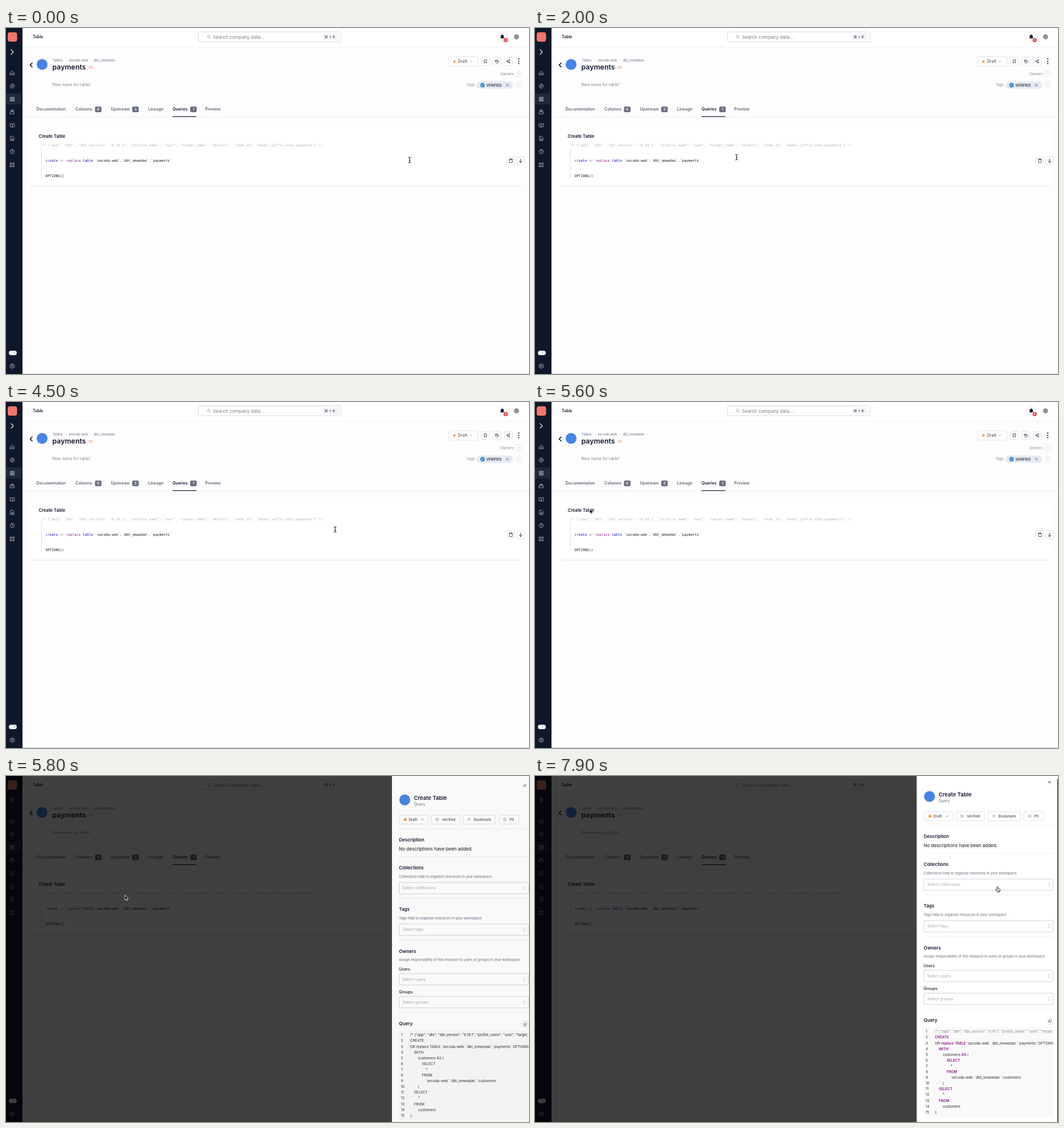
These frames come from a looping animation (920x608 px, 8000 ms). An HTML page:

```html
<!DOCTYPE html>
<html lang="en">
<head>
<meta charset="utf-8">
<title>Query drawer</title>
<style>
html, body { margin: 0; width: 100%; height: 100%; overflow: hidden; background: #fdfdfe; }
svg { display: block; width: 920px; height: 608px; font-family: Inter, "DejaVu Sans", sans-serif; }
.mono { font-family: "DejaVu Sans Mono", monospace; }
</style>
</head>
<body>
<svg id="stage" viewBox="0 0 920 608"></svg>
<script>
const INK = '#14182e', GREY = '#6b7080', PALE = '#a3a7b0', LINE = '#d9dbe0', BLUE = '#4784e6', PURPLE = '#8c168c';

const text = (x, y, s, size = 7, weight = 400, fill = INK, more = '') =>
  `<text x="${x}" y="${y}" font-size="${size}" font-weight="${weight}" fill="${fill}" ${more}>${s}</text>`;
const rect = (x, y, w, h, fill, r = 0, stroke = 'none') =>
  `<rect x="${x}" y="${y}" width="${w}" height="${h}" rx="${r}" fill="${fill}" stroke="${stroke}" stroke-width=".8"/>`;
const circle = (x, y, r, fill, stroke = 'none') =>
  `<circle cx="${x}" cy="${y}" r="${r}" fill="${fill}" stroke="${stroke}" stroke-width=".7"/>`;
const path = (d, stroke, width = 1, fill = 'none') =>
  `<path d="${d}" fill="${fill}" stroke="${stroke}" stroke-width="${width}" stroke-linecap="round" stroke-linejoin="round"/>`;
// Icons are drawn on a 24 unit grid and centred on x, y.
const icon = (x, y, size, d, stroke = INK, width = 2, fill = 'none') =>
  `<g transform="translate(${x - size / 2} ${y - size / 2}) scale(${size / 24})">${path(d, stroke, width, fill)}</g>`;
const rule = (x1, x2, y, color = '#e9eaee') => rect(x1, y - .4, x2 - x1, .8, color);

const ICONS = {
  home: 'M3 11 12 3l9 8v10h-6v-7H9v7H3z',
  compass: 'M12 2a10 10 0 1 0 .1 0zM16 8l-2 6-6 2 2-6z',
  list: 'M2 4H22M2 9.5H22M2 15H22M2 20.5H22',
  stack: 'M3 11h18v10H3zM5 7h14M7 3h10',
  book: 'M12 6C9 4 5 4 2 4v15c3 0 7 0 10 2 3-2 7-2 10-2V4c-3 0-7 0-10 2v15',
  file: 'M5 2h9l6 6v14H5zM9 18v-3M12 18v-6M15 18v-4',
  help: 'M12 2a10 10 0 1 0 .1 0zM9 9a3 3 0 1 1 4 3q-1 .5-1 2M12 17v.2',
  grid: 'M3 3h6v6H3zM15 3h6v6h-6zM3 15h6v6H3zM15 15h6v6h-6z',
  gear: 'M12 8.5a3.5 3.5 0 1 0 .1 0zM10 2h4l1 3 3 1.5 3-1 2 3.5-2.5 2v3l2.5 2-2 3.5-3-1-3 1.5-1 3h-4l-1-3-3-1.5-3 1-2-3.5 2.5-2v-3L1 9l2-3.5 3 1L9 5z',
  search: 'M10 3a7 7 0 1 0 .1 0zM15 15l6 6',
  bell: 'M12 2a7 7 0 0 0-7 7v5l-2 4h18l-2-4V9a7 7 0 0 0-7-7zM10 21h4',
  bookmark: 'M6 3h12v18l-6-5-6 5z',
  history: 'M3 5v5h5M3.5 10a9 9 0 1 1 0 5M12 7v5l4 2',
  share: 'M18 2a3 3 0 1 0 .1 0zM6 9a3 3 0 1 0 .1 0zM18 16a3 3 0 1 0 .1 0zM8.5 10.5l7-4M8.5 13.5l7 4',
  clipboard: 'M8 4H5v17h14V4h-3M8 2h8v5H8z',
  down: 'M12 3v18M5 14l7 7 7-7',
  cross: 'M5 5 19 19M19 5 5 19',
  plus: 'M12 6v12M6 12h12',
  check: 'M6 12l4 4 8-8',
  caret: 'M5 9l7 7 7-7',
  sort: 'M7 8l5-5 5 5M7 16l5 5 5-5',
  copy: 'M8 3h13v13H8zM16 16v5H3V8h5'
};

const sourceBadge = (x, y) => circle(x, y, 9.6, BLUE);
const pill = (x, y, w, h) => rect(x, y, w, h, '#fff', 2, LINE);

function sidebar() {
  const rows = { home: 79, compass: 102, list: 125, stack: 147.5, book: 171, file: 194, help: 217, grid: 240.5, gear: 594 };
  return rect(0, 0, 29, 608, '#0f172a') + rect(0, 115, 27, 19.5, '#1e293b')
    + rect(3, 7.5, 16.5, 16.5, '#f0776c', 4)
    + path('M9 38l4 4-4 4', '#dde1e8', 1.3)
    + Object.entries(rows).map(([name, y]) => icon(11, y, 9, ICONS[name], name == 'list' ? '#fff' : '#c3c9d4')).join('')
    + rect(5, 567, 14, 8, '#e6e8ec', 4) + circle(9.2, 571, 3.4, '#fff', '#bbc');
}

function header() {
  return rect(29, 0, 891, 33.5, '#fff') + rule(29, 920, 33.8, '#f0f0f3')
    + text(47, 18, 'Table', 7, 600)
    + rect(338.5, 7, 251, 17, '#fff', 2.5, '#cdd0d6')
    + icon(357, 15.5, 7.5, ICONS.search, '#777c88')
    + text(364, 18.6, 'Search company data...', 8.1, 400, '#777c88')
    + rect(557, 10, 28, 11, '#f3f4f6', 2) + text(560, 17.8, '⌘ + K', 6.6, 500, '#444a58')
    + circle(873, 15.5, 8.6, '#fff', '#dfe1e6') + icon(873, 15.5, 8.5, ICONS.bell, INK, 1.5, INK)
    + circle(879, 21.2, 3.7, '#e5484d') + text(879, 23, '8', 4.6, 500, '#fff', 'text-anchor="middle"')
    + circle(898, 15.5, 4.5, '#8d929c');
}

function hero() {
  const tabs = [[53.5, 'Documentation'], [122, 'Columns', 156.5, 6], [184.5, 'Upstream', 222, 3],
    [250, 'Lineage'], [293, 'Queries', 324, 1], [350.5, 'Preview']];
  const buttons = { bookmark: 843.3, history: 863.5, share: 883.5 };
  const crumb = (x, s) => text(x, 59, s, 5.6, 500, '#82879a');
  const chevron = x => path(`M${x} 55l1.5 2-1.5 2`, '#d5d7de', .6);
  return path('M46 61.5l-3.5 3.5 3.5 3.5', '#000', 1.5) + sourceBadge(63.5, 64)
    + crumb(82, 'Tables') + chevron(105.5) + crumb(110.5, 'secoda-web') + chevron(148.5) + crumb(154.5, 'dbt_omwedan')
    + text(81.5, 73, 'payments', 12.35, 600)
    + path('M146.8 67.5l-1.8 1.8 1.8 1.8M150.7 67.5l1.8 1.8-1.8 1.8M149.4 66.8l-1.3 5', '#e8695f', .8)
    + text(81.5, 102.3, 'New name for table!', 7, 400, '#82868f')
    + pill(779, 50.5, 51, 16.5) + circle(788.8, 58.7, 2.2, '#f0a150')
    + text(795, 61.2, 'Draft', 7, 500, '#555a68') + icon(818, 58.7, 5, ICONS.caret, '#555a68', 3)
    + Object.entries(buttons).map(([name, x]) => pill(x - 7, 51.5, 14, 14.5) + icon(x, 58.7, 7.5, ICONS[name], INK, 2.4)).join('')
    + [54.5, 58.5, 62.5].map(y => circle(902, y, 1.1, '#111')).join('')
    + text(870, 82.8, 'Owners', 6.3, 400, '#82868f') + text(810, 102.3, 'Tags', 6.3, 400, '#82868f')
    + [80.5, 100.3].map(y => circle(902, y, 5.2, '#fff', '#d3d5da') + icon(902, y, 6, ICONS.plus, '#b5b8c0')).join('')
    + rect(828, 94, 64, 12.8, '#e7e9f1', 6.4) + circle(838.3, 100.4, 3.9, '#3490dc') + icon(838.3, 100.4, 6, ICONS.check, '#fff', 3)
    + text(845, 102.6, 'VERIFIED', 6, 600, '#333a50') + icon(882, 100.4, 7, ICONS.cross, '#333a50', 2.3)
    + rule(29, 920, 156.4, '#ebecf0')
    + tabs.map(([x, label, badgeX, count]) => text(x, 144.9, label, 7, 600, label == 'Queries' ? INK : '#5f6575')
      + (badgeX ? rect(badgeX, 138, 11.5, 10, GREY, 2.2)
        + text(badgeX + 5.7, 145.3, count, 6.2, 600, '#fff', 'text-anchor="middle"') : '')).join('')
    + rect(293, 155, 42, 1.3, '#2b3045');
}

function card() {
  const span = (s, fill) => `<tspan fill="${fill}">${s}</tspan>`;
  const mono = (x, y, s, fill = '#111') => text(x, y, s, 6.05, 400, fill, 'class="mono"');
  return rect(45, 175, 863, 104, '#f3f3f6', 3) + rect(45, 176, 863, 102, '#eeeef1', 3) + rect(45, 172, 863, 105, '#fff', 3)
    + rect(45, 171, 863, 6, '#fdfdfe')
    + text(57.5, 192.8, 'Create Table', 7.65, 600)
    + rect(62, 211, .8, 53, '#d4d5d8')
    + mono(62, 207.6, '/* {"app": "dbt", "dbt_version": "0.19.1", "profile_name": "user", "target_name": "default", "node_id": "model.jaffle_shop.payments"} */', '#b3b4b8')
    + mono(69.5, 235, span('create', '#1414b4') + span(' or ', '#888') + span('replace', PURPLE) + span(' table', '#1414b4')
      + ' `secoda-web`.`dbt_omwedan`.`payments`')
    + mono(69.5, 261.9, 'OPTIONS()')
    + pill(881.5, 226.5, 13.5, 13.5) + icon(888.3, 233.3, 8.5, ICONS.clipboard)
    + pill(898.5, 226.5, 13.5, 13.5) + icon(905.2, 233.3, 8.5, ICONS.down, INK, 2.5);
}

const QUERY = [
  [0, '/* {"app": "dbt", "dbt_version": "0.19.1", "profile_name": "user", "target_name": "default"} */'],
  [0, 'CREATE'], [0, 'OR replace TABLE `secoda-web`.`dbt_omwedan`.`payments` OPTIONS() AS ('],
  [1, 'WITH'], [2, 'customers AS ('], [3, 'SELECT'], [4, '*'], [3, 'FROM'],
  [4, '`secoda-web`.`dbt_omwedan`.`customers`'], [2, ')'],
  [1, 'SELECT'], [2, '*'], [1, 'FROM'], [2, 'customers'], [0, ');']
];
const lineY = i => 457.3 + i * 10.1;

function queryCode(highlighted) {
  return QUERY.map(([indent, line], i) => {
    const comment = highlighted && i == 0;
    const marked = !highlighted || comment ? line
      : line.replace(/CREATE|replace TABLE|WITH|AS|SELECT|FROM/g, word => `<tspan font-weight="600" fill="${PURPLE}">${word}</tspan>`);
    return text(703.5 + indent * 6.85, lineY(i), marked, 6.28, 400, comment ? '#8b8b8b' : '#2b2b2b', comment ? 'font-style="italic"' : '');
  }).join('');
}

function drawer() {
  const heading = (y, s) => text(683.8, y, s, 8, 600);
  const hint = (y, s) => text(683.8, y, s, 6.02, 400, '#62677a');
  const select = (y, s) => rect(684, y, 227.5, 20, '#fff', 2, '#c6c9d0') + text(690, y + 12.4, s, 7, 400, PALE)
    + icon(904.5, y + 10, 7.5, ICONS.sort, '#8b909c', 2);
  const action = (x, w, label, mark) => pill(x, 68.5, w, 16) + text(x + 18.5, 78.8, label, 6.3, 500, '#4b5061') + mark;
  const tick = x => circle(x, 76.5, 3, '#c9cedb') + icon(x, 76.5, 5, ICONS.check, '#fff', 3);
  return icon(905, 16.8, 7, ICONS.cross, '#222', 2.8) + sourceBadge(694, 42)
    + text(710, 41.5, 'Create Table', 9.5, 600) + text(710, 51.5, 'Query', 7, 400, GREY)
    + action(684, 51, '', circle(694.8, 76.5, 2.6, '#f0a53c') + text(701, 78.8, 'Draft', 6.3, 500, '#4b5061') + icon(725, 76.5, 5.5, ICONS.caret, '#333', 3))
    + action(741, 50, 'Verified', tick(751)) + action(797, 56.5, 'Bookmark', icon(807, 76.5, 6, ICONS.bookmark, '#c3c8d6', 2, '#c3c8d6'))
    + action(860, 34.5, 'PII', tick(870))
    + [93, 142, 215, 288, 416].map(y => rule(684, 911.5, y)).join('')
    + heading(115, 'Description') + text(683.8, 130.8, 'No descriptions have been added.', 8, 400, '#111')
    + heading(164.3, 'Collections') + hint(179, 'Collections help to organize resources in your workspace.') + select(187, 'Select collections')
    + heading(237.3, 'Tags') + hint(252, 'Tags help to organize resources in your workspace.') + select(260, 'Select tags')
    + heading(310.8, 'Owners') + hint(325, 'Assign responsibility of this resource to users or groups in your workspace.')
    + text(683.8, 342.4, 'Users', 7, 500) + select(347.3, 'Select users')
    + text(683.8, 382.3, 'Groups', 7, 500) + select(387.5, 'Select groups')
    + heading(438.3, 'Query') + pill(900.5, 431, 11, 11) + icon(906, 436.5, 6.5, ICONS.copy, '#444')
    + rect(684, 447, 227.5, 159, '#f9f9f9')
    + QUERY.map((_, i) => text(687.3, lineY(i), i + 1, 6.28, 400, '#333')).join('')
    + `<g clip-path="url(#codeClip)"><g id="plain">${queryCode(false)}</g><g id="highlighted">${queryCode(true)}</g></g>`;
}

const IBEAM = 'M-2-5Q0-5 0-3V3Q0 5-2 5M2-5Q0-5 0-3M0 3Q0 5 2 5M-1 .8H1';
const POINTERS = {
  ibeam: path(IBEAM, '#fff', 2) + path(IBEAM, '#222', 1),
  arrow: path('M0 0V8.3L1.9 6.6 3.2 9.5 4.5 9 3.2 6.2H5.8Z', '#fff', .8, '#000'),
  hand: path('M-1 .8Q0-.6 1 .8V4L4.2 4.6Q5.2 5 5 6.2L4 9.6H-.8L-3.4 6.2Q-3.4 4.8-2 5.4L-1 6.2ZM1.2 7v1.5M2.8 7v1.5', '#111', .8, '#fff')
};

document.getElementById('stage').innerHTML = `
  <clipPath id="codeClip"><rect x="684" y="440" width="227.5" height="168"/></clipPath>
  ${rect(0, 0, 920, 608, '#fdfdfe')}${header()}${hero()}${card()}${sidebar()}${rule(29, 920, 607.6, '#c9c9cc')}
  <rect id="shade" width="920" height="608"/>
  <g id="drawer">${rect(671.4, 0, 249, 608, '#fff')}<g id="content">${drawer()}</g>
    <g id="scrollbar">${rect(918.6, 5, 1.4, 603, '#444', .7)}</g></g>
  <g id="pointer">${Object.entries(POINTERS).map(([name, shape]) => `<g id="${name}">${shape}</g>`).join('')}</g>`;

// Pointer stops: time, x, y, shape.
const STOPS = [
  [0, 710, 232, 'ibeam'], [300, 710, 232, 'ibeam'], [600, 742, 220, 'ibeam'], [800, 742, 220, 'ibeam'],
  [1100, 311, 220, 'ibeam'], [1200, 311, 220, 'ibeam'], [1700, 107, 199, 'ibeam'], [1800, 107, 199, 'ibeam'],
  [2000, 354.5, 227, 'ibeam'], [2100, 500, 250, 'ibeam'], [2200, 634, 219, 'ibeam'], [2300, 634, 219, 'ibeam'],
  [2500, 698, 232, 'ibeam'], [2800, 698, 232, 'ibeam'], [2900, 914, 234, 'hand'], [3000, 914, 234, 'hand'],
  [3300, 904.5, 234, 'hand'], [3600, 904.5, 234, 'hand'], [3900, 880, 183, 'arrow'], [4100, 867, 212, 'ibeam'],
  [4300, 867, 212, 'ibeam'], [4600, 435, 230, 'ibeam'], [4700, 435, 230, 'ibeam'], [5400, 96.5, 188, 'arrow'],
  [5600, 96.5, 188, 'arrow'], [5700, 133.5, 195, 'arrow'], [6400, 663, 297, 'arrow'], [6700, 716, 41.5, 'hand'],
  [6900, 757, 34, 'hand'], [7100, 796, 60, 'hand'], [7300, 758, 28, 'hand'], [7700, 813.5, 194, 'hand'], [8000, 813.5, 194, 'hand']
];

const byId = id => document.getElementById(id);
const show = (id, visible) => byId(id).setAttribute('display', visible ? 'inline' : 'none');

function draw(now) {
  const t = Math.floor(now % 8000 / 100) * 100;
  const next = STOPS.findIndex(stop => stop[0] > t);
  const [t0, x0, y0, shape] = STOPS[next - 1], [t1, x1, y1] = STOPS[next];
  const k = (t - t0) / (t1 - t0);
  byId('pointer').setAttribute('transform', `translate(${x0 + (x1 - x0) * k} ${y0 + (y1 - y0) * k})`);
  Object.keys(POINTERS).forEach(name => show(name, name == shape));

  const open = t < 5700 ? 0 : t < 5800 ? .62 : t < 5900 ? .97 : 1;
  byId('shade').setAttribute('opacity', .75 * Math.min(1, open * 1.52));
  byId('drawer').setAttribute('opacity', open);
  byId('drawer').setAttribute('transform', `translate(${250 * (1 - open)} 0)`);
  show('drawer', open > 0);
  show('plain', t < 5900);
  show('highlighted', t >= 5900);
  const scrolled = t >= 7900;
  byId('content').setAttribute('transform', `translate(0 ${scrolled ? -6 : 0})`);
  show('scrollbar', scrolled);
}

const start = performance.now();
function tick() {
  draw(performance.now() - start);
  requestAnimationFrame(tick);
}
tick();
</script>
</body>
</html>
```
